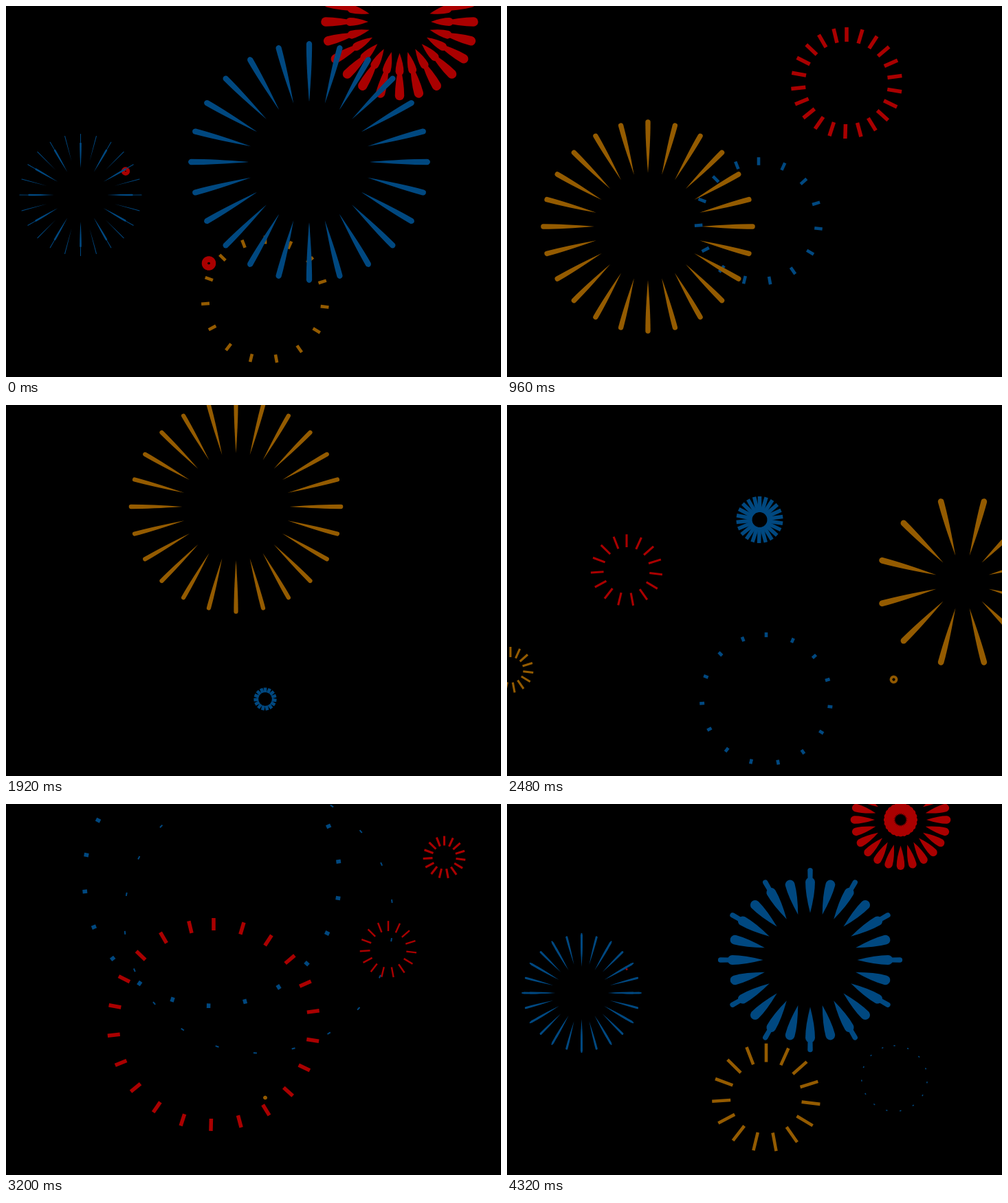
An HTML page with a canvas for the animation above (4400 ms loop, 720 px wide and 540 px high).

```html
<!DOCTYPE html>
<html lang="en">
<head>
<meta charset="utf-8">
<title>Fireworks</title>
<style>
  html, body { margin: 0; width: 100%; height: 100%; overflow: hidden; background: #000; }
  canvas { display: block; width: 720px; height: 540px; }
</style>
</head>
<body>
<canvas id="sky" width="720" height="540"></canvas>
<script>
const ctx = document.getElementById('sky').getContext('2d');
const LOOP = 4400, STEP = 80;
const RED = '#aa0000', BLUE = '#004880', GOLD = '#945b00';

// Key rows: progress, inner radius, outer radius, width
const SPARK = [
  [0, 0, 0, 4.6], [.05, 0, 4, 4.6], [.12, 1.5, 9, 4.6], [.3, 20, 26, 4.6],
  [.42, 26, 48, 4.6], [.55, 50, 78, 4.6], [.64, 81, 93, 4.6],
  [.82, 90, 97, 4.6], [1, 97, 97, 4.6]
];
const RING = [
  [0, 0, 0, 5.5], [.06, 2, 10, 5.5], [.21, 11, 34, 5.5], [.39, 137, 155, 5.5],
  [.55, 172, 183, 5.5], [.7, 184, 190, 5.5], [.93, 194.5, 196.5, 5], [1, 197, 197, 5]
];
const PETAL = [
  [0, 0, 0, .01], [.05, 0, .03, .02], [.15, .04, .135, .05], [.25, .25, .43, .065],
  [.35, .37, .65, .075], [.45, .475, .95, .045], [.85, .475, .95, .035],
  [.95, .57, .99, .012], [1, .7, 1, 0]
];

function at(keys, p) {
  const i = Math.max(1, keys.findIndex(k => k[0] >= p));
  const a = keys[i - 1], b = keys[i];
  const f = (p - a[0]) / (b[0] - a[0]);
  return [1, 2, 3].map(j => a[j] + (b[j] - a[j]) * f);
}

function bar(inner, outer, w) {
  ctx.fillRect(inner, -w / 2, outer - inner, w);
}

function drop(inner, outer, w) {
  const r = Math.min(w / 2, (outer - inner) / 2), c = outer - r;
  ctx.beginPath();
  ctx.moveTo(inner, 0);
  ctx.quadraticCurveTo(inner + (c - inner) * .6, -r, c, -r);
  ctx.ellipse(c, 0, r, r, 0, -Math.PI / 2, Math.PI / 2);
  ctx.quadraticCurveTo(inner + (c - inner) * .6, r, inner, 0);
  ctx.fill();
}

const shows = [];
const add = (x, y, color, start, dur, look) =>
  shows.push({ x, y, color, start, dur, innerK: 1, widthK: 1, from: 0, ...look });

const spark = (x, y, color, start, scale, dur) =>
  add(x, y, color, start, dur, { keys: SPARK, part: bar, n: 15, turn: 24.2, scale });
const ring = (x, y, color, start) =>
  add(x, y, color, start, 1000, { keys: RING, part: bar, n: 22, turn: 16.5, scale: 1 });
const petals = (x, y, color, start, scale, n, extra) =>
  add(x, y, color, start, 800, { keys: PETAL, part: drop, n, turn: 360 / n, scale, ...extra });

ring(295, 374.5, RED, -60);
ring(494, 112, RED, 680);
ring(367.5, 167, BLUE, 2270);
ring(299.5, 108, BLUE, 2520);
ring(302, 321, RED, 2810);

spark(174, 240.5, RED, -84, .67, 700);
spark(366, 313.5, BLUE, 370, 1, 900);
spark(563, 400, RED, 1165, .5, 650);
spark(377, 428, BLUE, 1740, 1, 900);
spark(174, 240.5, RED, 2095, .67, 700);
spark(5, 385.5, GOLD, 2180, .67, 700);
spark(562.5, 399.5, GOLD, 2385, .5, 640);
spark(556, 211.5, RED, 2815, .53, 700);
spark(637.5, 77.5, RED, 2913, .67, 700);
spark(377, 427.5, GOLD, 3180, 1, 900);
spark(429.5, 87.5, GOLD, 3402, .5, 650);
spark(563.5, 399.5, BLUE, 3730, .5, 640);
spark(377, 427.5, GOLD, 3820, 1, 900);

petals(205, 321, GOLD, 40, 99, 12, { widthK: 1.6, innerK: 1.1 });
petals(205, 321, GOLD, 600, 164, 24);
petals(334.5, 148, GOLD, 1345, 164, 24);
petals(662.5, 257.5, GOLD, 2000, 132, 12, { from: 15, innerK: .63, widthK: 1.6 });
petals(108.5, 275, BLUE, 3600, 90, 12);
petals(108.5, 275, BLUE, 3640, 90, 24);
petals(108.5, 275, BLUE, 3715, 80, 12);
petals(572.5, 23, RED, 4128, 182, 24, { innerK: .9 });
petals(572.5, 23, RED, 4200, 182, 24);
petals(441, 227, BLUE, 4020, 185, 12, { widthK: .6 });
petals(441, 227, BLUE, 4040, 185, 24);

function paint(t) {
  ctx.setTransform(1, 0, 0, 1, 0, 0);
  ctx.fillStyle = '#000';
  ctx.fillRect(0, 0, 720, 540);
  for (const s of shows) {
    const p = ((t - s.start + LOOP) % LOOP) / s.dur;
    if (p >= 1) continue;
    const [inner, outer, w] = at(s.keys, p).map(v => v * s.scale);
    ctx.fillStyle = s.color;
    for (let i = 0; i < s.n; i++) {
      ctx.setTransform(1, 0, 0, 1, s.x, s.y);
      ctx.rotate((s.from + i * s.turn - 90) * Math.PI / 180);
      s.part(inner * s.innerK, outer, w * s.widthK);
    }
  }
}

function tick() {
  paint(Math.floor((performance.now() % LOOP) / STEP) * STEP);
  requestAnimationFrame(tick);
}
tick();
</script>
</body>
</html>
```
